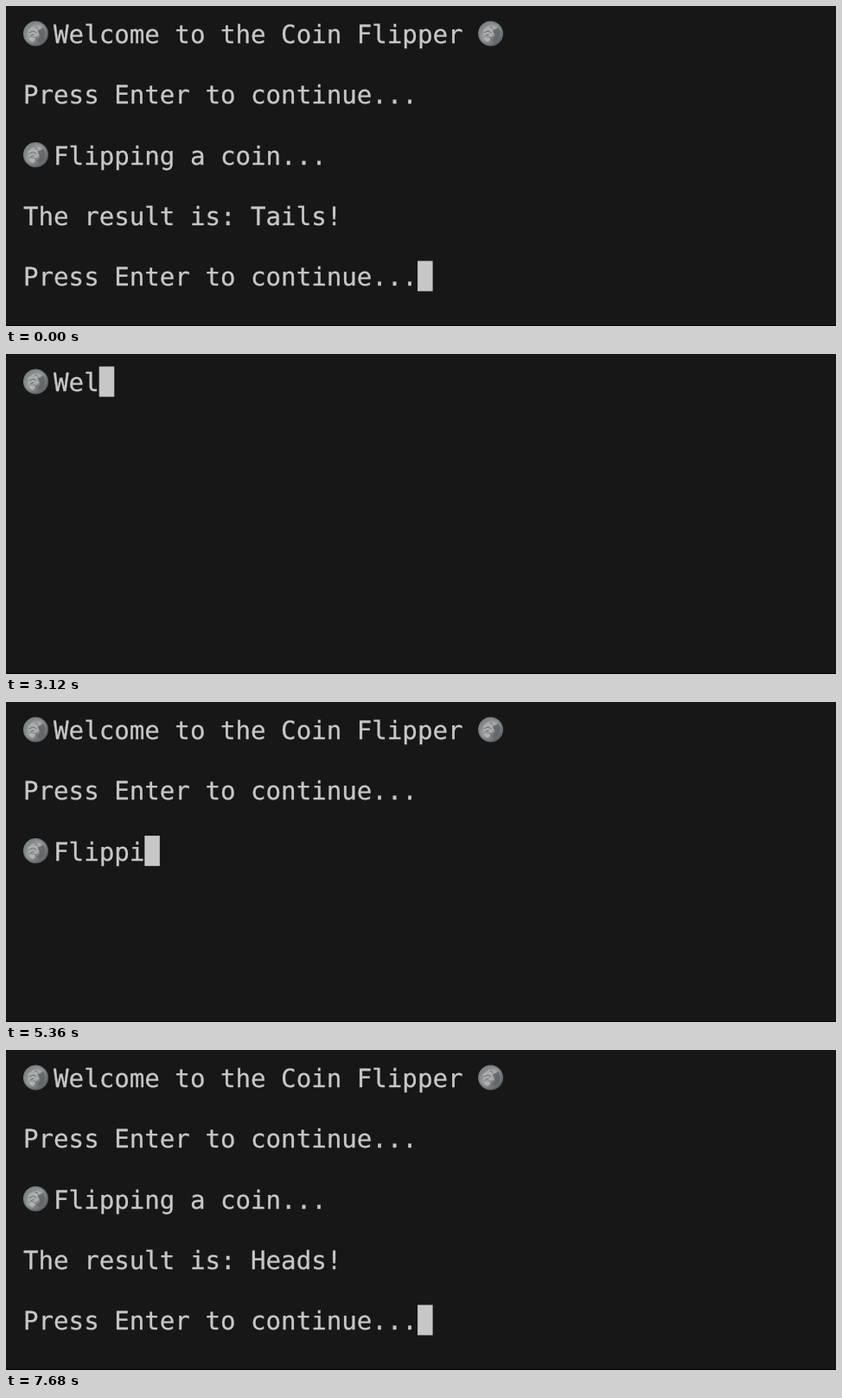
An HTML page that plays this animation: 960 px wide and 371 px high, repeating every 8 s.

```html
<!DOCTYPE html>
<html lang="en">
<head>
<meta charset="utf-8">
<title>Coin Flipper</title>
<style>
  html, body { margin: 0; width: 100%; height: 100%; overflow: hidden; background: #171717; }
  svg { display: block; width: 100%; height: 100%; }
  text {
    font: 29.13px "DejaVu Sans Mono", monospace;
    white-space: pre;
    text-rendering: geometricPrecision;
    fill: #c7c7c7;
    stroke: #c7c7c7;
    stroke-width: .3;
  }
</style>
</head>
<body>
<svg viewBox="0 0 960 371" xmlns="http://www.w3.org/2000/svg">
  <defs>
    <linearGradient id="rim" x1="0" y1="0" x2="1" y2="1">
      <stop offset="0" stop-color="#858889"/>
      <stop offset=".5" stop-color="#74787a"/>
      <stop offset="1" stop-color="#53585a"/>
    </linearGradient>
    <linearGradient id="face" x1="0" y1="0" x2="1" y2="1">
      <stop offset="0" stop-color="#777a7c"/>
      <stop offset=".45" stop-color="#96999a"/>
      <stop offset="1" stop-color="#53585b"/>
    </linearGradient>
    <g id="coin">
      <circle r="14.5" fill="url(#rim)"/>
      <circle r="12.8" fill="url(#face)"/>
      <path d="M-9-4Q-4-10 3-9L8-6 3-3 5 1 0 4-5 2-9 3Z" fill="#b2b5b6" opacity=".75"/>
      <path d="M-8 5Q-3 3 0 6L-3 10Q-7 9-8 5Z" fill="#c0c2c3" opacity=".7"/>
      <path d="M2-4 9-7 11-1 9 6 5 10 2 7 5 3Z" fill="#5d6264" opacity=".75"/>
      <path d="M-8-1-3-3 1-1M-6 2-2 1M0 5 3 9M-1-8 3-6" fill="none" stroke="#666b6d"/>
    </g>
  </defs>
  <rect width="960" height="371" fill="#171717"/>
  <rect y="370" width="960" height="1" fill="#050304"/>
  <rect id="cursor" width="17.54" height="35.1" fill="#c7c7c7"/>
  <g id="lines"></g>
</svg>
<script>
const LOOP = 8000, TICK = 80, KEY = 43.3;
const LEFT = 20, TOP = 14.5, CELL = 17.54, ROW = 35.13;

// "@" stands for a coin
const WELCOME = "@ Welcome to the Coin Flipper @\n\n";
const PROMPT = "Press Enter to continue...";
const FLIP = "\n@ Flipping a coin...\n\n";
const QUESTION = "Do you want to flip the coin? (yes/no) \n";
const result = side => `The result is: ${side}!\n\n`;

const typed = (text, start, t) =>
  text.slice(0, Math.max(0, Math.floor((t - start) / KEY)));

// Types a message, then shows the prompt at once when it is complete
function typedThenPrompt(text, start, t) {
  const part = typed(text, start, t);
  return part === text ? part + PROMPT : part;
}

function screenAt(t) {
  if (t < 480) return WELCOME + PROMPT + "\n" + FLIP + result("Tails") + PROMPT;
  if (t < 2960) {
    const answer = t < 2560 ? "" : t < 2720 ? "y" : t < 2800 ? "ye" : "yes";
    return typed(QUESTION, 432, t) + answer;
  }
  let out = typedThenPrompt(WELCOME, 2884, t);
  if (t >= 5040) out += "\n" + typed(FLIP, 4965, t);
  if (t >= 6720) out += typedThenPrompt(result("Heads"), 6682, t);
  return out;
}

const lines = document.getElementById("lines");
const cursor = document.getElementById("cursor");

function drawLine(line, row) {
  const y = TOP + row * ROW;
  const coins = [...line].map((c, col) => c === "@"
    ? `<use href="#coin" x="${LEFT + col * CELL + 14.4}" y="${y + 17.5}"/>` : "");
  const text = line.replace(/@/g, " ");
  return `<text x="${LEFT}" y="${y + 28.6}" xml:space="preserve">${text}</text>` + coins.join("");
}

let shown = null;
function render(t) {
  const screen = screenAt(Math.floor(t / TICK) * TICK);
  if (screen === shown) return;
  shown = screen;
  const rows = screen.split("\n");
  const last = rows.length - 1;
  lines.innerHTML = rows.map(drawLine).join("");
  cursor.setAttribute("x", LEFT + rows[last].length * CELL);
  cursor.setAttribute("y", TOP + last * ROW);
}

const begin = performance.now();
function loop() {
  render((performance.now() - begin) % LOOP);
  requestAnimationFrame(loop);
}
loop();
</script>
</body>
</html>
```
